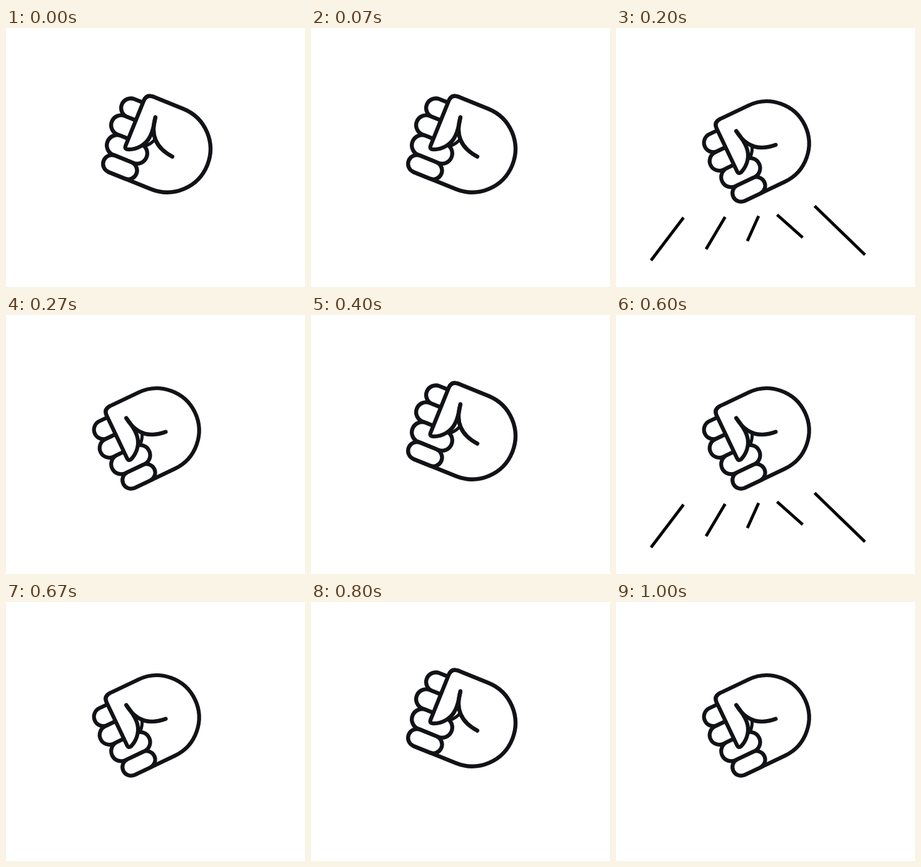
Animation of 478x414 px, one loop 1190 ms. Source, as an HTML page:

```html
<!DOCTYPE html>
<html lang="en">
<head>
<meta charset="utf-8">
<title>Knocking fist</title>
<style>
  html, body { margin: 0; width: 100%; height: 100%; overflow: hidden; background: #fff; }
  svg { display: block; width: 100%; height: 100%; }
  #hand { fill: none; stroke: #121317; stroke-width: 6.2; stroke-linecap: round; stroke-linejoin: round; }
  #hand .skin { fill: #fff; }
  #rays { stroke: #000; stroke-width: 4.8; fill: none; }
</style>
</head>
<body>
<svg viewBox="0 0 478 414">
  <g id="rays">
    <path d="M108 303L56 371.500M174.500 302L144 353.500M228 300.500L210 340.500M257.500 298.500L298.500 335M317.500 284.500L398 362.500"/>
  </g>
  <!-- Hand is drawn upright around the centre of its round back. -->
  <g id="hand">
    <path class="skin" d="M-62 -56Q-62 -67.500 -50 -67.500H0A67.500 67.500 0 0 1 0 67.500H-71"/>
    <rect class="skin" x="-91.500" y="-53" width="44" height="30" rx="15"/>
    <rect class="skin" x="-96" y="-23" width="50" height="31" rx="15.500"/>
    <rect class="skin" x="-90.500" y="8" width="65.500" height="32" rx="16"/>
    <rect class="skin" x="-85" y="40" width="55" height="27.500" rx="13.750"/>
    <path class="skin" d="M-35.500 -39C-33 -28 -31 -18 -32 -8C-33 6 -43 18 -55 23Q-62 26 -62 19V-56Q-62 -67.500 -50 -67.500"/>
    <path d="M-35.500 -39C-33 -14 -20 5 12 8"/>
    <path d="M-23 -7Q-26 2 -33 8" stroke-width="5"/>
  </g>
</svg>
<script>
  const LOOP = 1190, BEAT = 200, FLASH = 70;
  const UP = "translate(257.6 193.4) rotate(22) scale(1.025)";
  const DOWN = "translate(241.1 184.7) rotate(-25.5)";
  const hand = document.getElementById("hand");
  const rays = document.getElementById("rays");

  function draw(ms) {
    const t = ms % LOOP;
    const beat = Math.floor(t / BEAT);
    const down = beat % 2 === 1;
    // The first two knocks flash impact rays; the last one is silent.
    const hit = down && beat < 5 && t % BEAT < FLASH;
    hand.setAttribute("transform", down ? DOWN : UP);
    rays.setAttribute("visibility", hit ? "visible" : "hidden");
  }

  const start = performance.now();
  function tick() {
    draw(performance.now() - start);
    requestAnimationFrame(tick);
  }
  tick();
</script>
</body>
</html>
```
